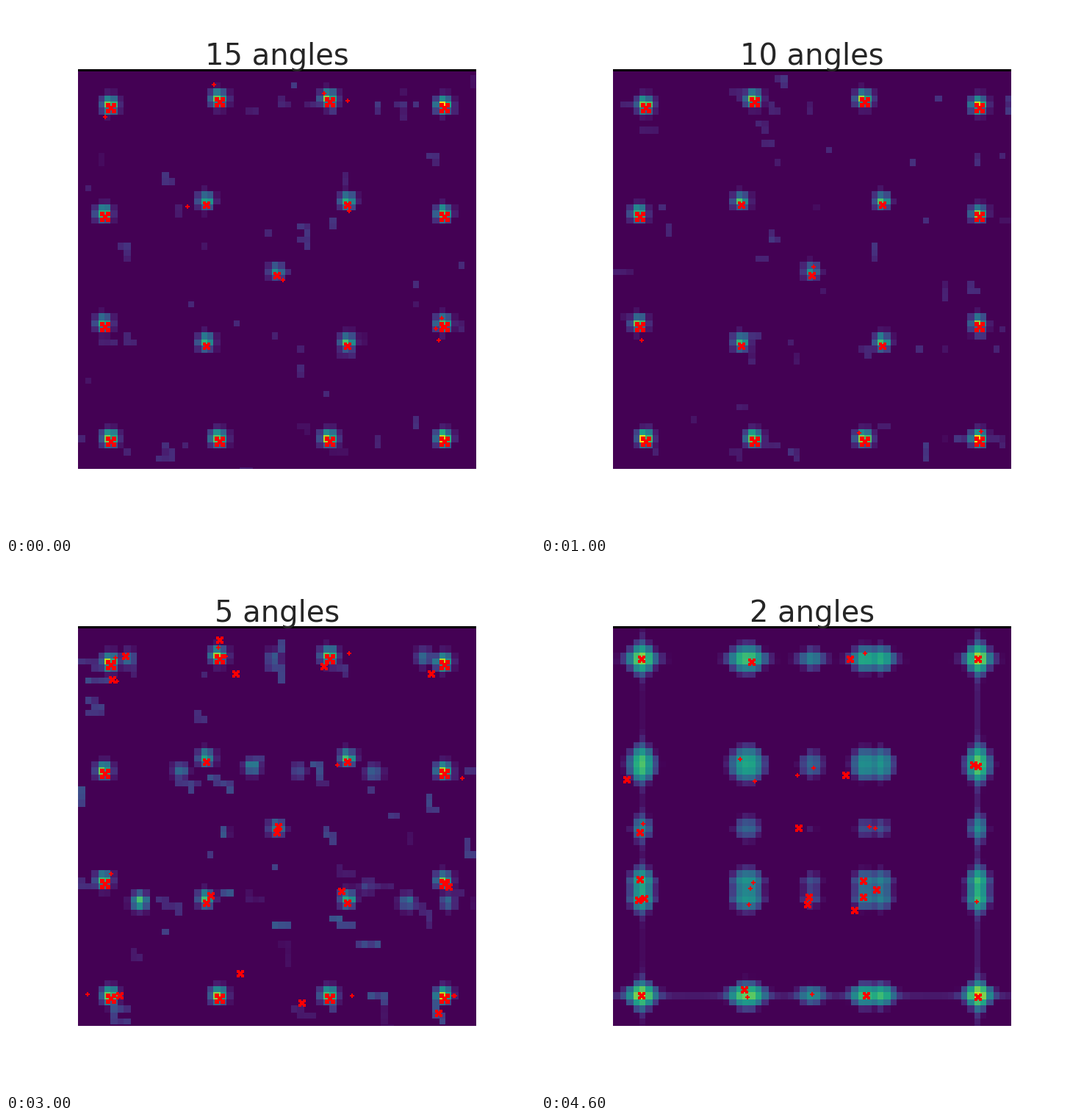
These frames come from a looping animation (720 by 720 pixels, 5 s). A matplotlib script:

```python
import matplotlib
import matplotlib.pyplot as plt
import numpy as np
from itertools import product
from matplotlib.animation import FuncAnimation
from matplotlib.patches import Rectangle

STAGE = 720
X0, Y0 = 98, 86            # image corner on the stage
W, H = 271, 272            # image size in 2 px dots
CELLS = 63
PITCH = 4.3755             # dots per reconstruction cell
ANGLES = (15, 10, 8, 5, 2)

k = np.arange(CELLS)
CX = X0 + 0.5 + 2 * PITCH * (k + 0.5)
CY = Y0 + 1 + 2 * PITCH * (k + 0.5)
COL = np.searchsorted(np.ceil(PITCH * k), np.arange(W), "right") - 1
ROW = np.searchsorted(np.floor(PITCH * k + 0.55), np.arange(H), "right") - 1
COL, ROW = np.clip(COL, 0, CELLS - 1), np.clip(ROW, 0, CELLS - 1)


def source_layout():
    """Sources as x, y, strength: corners, sides, an inner square, the centre."""
    out = [(369.5, 366, .5)]
    for i, j in product((-1, 1), repeat=2):
        out += [(369.5 + 227 * i, 366 + 227 * j, .95),
                (365.5 + 75 * i, 362 + 231 * j, .88),
                (365.5 + 231 * i, 362 + 75 * j, .8),
                (369.5 + 96 * i, 366 + 96 * j, .7)]
    return np.array(out)


SOURCES = source_layout()
SHIFT = np.array([-2, -4])  # blobs sit slightly up and left of the detections
GHOSTS = [(165, 131, .4), (363, 130, .3), (568, 129, .4), (237, 283, .35),
          (335, 277, .5), (397, 284, .25), (500, 286, .35), (181, 461, .75),
          (546, 462, .4), (600, 462, .35), (490, 441, .2)]


def bump(t, c, s):
    return np.exp(-((t - c) / s) ** 2 / 2)


def blobs(points, rng, s=7.5):
    field = np.zeros((CELLS, CELLS))
    for x, y, a in points:
        field = np.maximum(field, a * np.outer(bump(CY, y, s), bump(CX, x, s)))
    field *= rng.uniform(.85, 1.1, field.shape)
    return np.where(field < .04, 0, field)


def streaks(field, rng, count, steps, level):
    """Short random walks, half of them along the rows of sources."""
    rows = np.searchsorted(CY, SOURCES[:, 1])
    for i in range(count):
        c = rng.integers(CELLS)
        r = rng.choice(rows) + rng.integers(-1, 2) if i % 2 else rng.integers(CELLS)
        v = rng.uniform(.04, level)
        for _ in range(rng.integers(1, steps + 1)):
            r, c = np.clip((r, c), 0, CELLS - 1)
            field[r, c] = max(field[r, c], v * rng.uniform(.6, 1))
            if rng.random() < .5:
                c += 1
            else:
                r += 1


def crosses(points):
    """Mask of detections given as x, y, reach in dots."""
    mask = np.zeros((H, W), bool)
    v, u = np.mgrid[:H, :W]
    for x, y, reach in points:
        dx, dy = abs(u - int((x - X0) / 2)), abs(v - int((y - Y0) / 2))
        far, near = np.maximum(dx, dy), np.minimum(dx, dy)
        if reach == 1:
            mask |= dx + dy <= 1
        else:
            mask |= (far <= reach) & ((far < 2) | (near > 0))
    return mask


def profile(t, centres):
    """Projection of all sources onto one axis."""
    total = sum(bump(t, c, 9) for c in centres)
    return .1 + .87 * np.sqrt(np.minimum(total / 4, 1))


def two_views(rng):
    """Sum of the two projections above a threshold, marks at the crossings."""
    xs, ys = (SOURCES[:, :2] + SHIFT).T
    field = np.maximum(profile(CX, xs) + profile(CY, ys)[:, None] - 1, 0)
    cols, rows = (137, 284, 363, 435, 463, 595), (132, 280, 360, 434, 458, 589)
    marks = []
    for x, y in product(cols, rows):
        corner = x in (137, 595) and y in (132, 589)
        count, spread = (1, 1) if corner else (rng.integers(0, 3), 8)
        for _ in range(count):
            dx, dy = rng.normal(0, spread, 2)
            marks.append((x + dx, y + dy, 2 if corner else rng.integers(1, 3)))
    return field, marks


def many_views(n, rng):
    sparse = n == 5
    points = [(*(s[:2] + SHIFT), s[2]) for s in SOURCES]
    field = blobs(points + GHOSTS * sparse, rng)
    streaks(field, rng, 60, 6 if sparse else 3, .3 if sparse else .18)
    marks = [(x, y, 3 if a > .75 else 2) for x, y, a in SOURCES]
    strays = {15: 11, 10: 4, 8: 10, 5: 27}[n]
    for x, y, _ in rng.choice(SOURCES, strays):
        dx, dy = rng.normal(0, 14, 2)
        marks.append((x + dx, y + dy, rng.integers(1, 3) if sparse else 1))
    return field, marks


def scene(n):
    rng = np.random.default_rng(n)
    field, marks = two_views(rng) if n == 2 else many_views(n, rng)
    rgb = matplotlib.colormaps["viridis"](field)[np.ix_(ROW, COL)][..., :3]
    rgb[crosses(marks)] = (1, 0, 0)
    return rgb


SCENES = [scene(n) for n in ANGLES]

fig = plt.figure(figsize=(10, 10), dpi=72, facecolor="white")
ax = fig.add_axes([X0 / STAGE, 1 - (Y0 + 2 * H) / STAGE, 2 * W / STAGE, 2 * H / STAGE])
ax.axis("off")
image = ax.imshow(SCENES[0], interpolation="nearest", aspect="auto")
fig.add_artist(Rectangle((X0 / STAGE, 1 - 89 / STAGE), 2 * W / STAGE, 3 / STAGE,
                         fc="black", lw=0, zorder=3))
label = fig.text(369 / STAGE, 1 - 80.4 / STAGE, "", size=40, color="#262626", zorder=4,
                 family="DejaVu Sans", ha="center", va="baseline")


def draw(i):
    image.set_data(SCENES[i])
    label.set_text(f"{ANGLES[i]} angles")
    return image, label


anim = FuncAnimation(fig, draw, frames=len(ANGLES), interval=1000, repeat=True)
plt.show()
```
